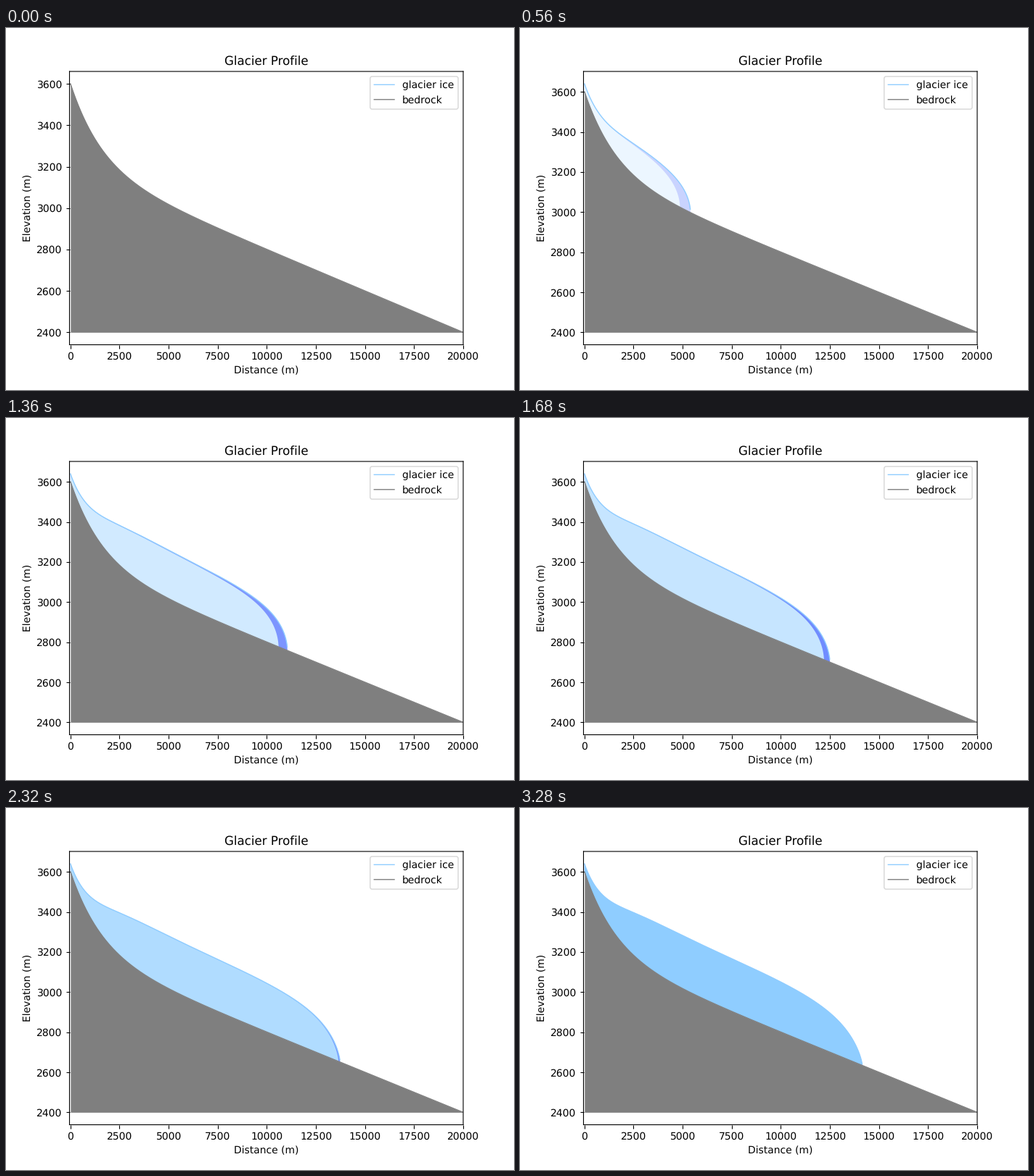
Recreate the animation shown at these times as a matplotlib script. Size 700 px wide and 500 px high, loop 3360 ms.

```python
import numpy as np
import matplotlib.pyplot as plt
from matplotlib.animation import FuncAnimation
from matplotlib.patches import Polygon

# Soft, unsnapped edges and unhinted text
plt.rcParams.update({"path.snap": False, "text.hinting": "none"})

FRAMES = 42
FLOOR = 2400
MAX_LENGTH = 14150
HEAD = 40  # ice thickness at the top of the valley
PEAK = 270

ICE = np.array([143, 205, 255]) / 255
FRESH = np.array([112, 140, 255]) / 255
ROCK = "#7f7f7f"

x = np.linspace(0, 20000, 2001)
bed = FLOOR + 800 * (1 - x / 20000) + 400 * np.exp(-x / 1600)

# Terminus: step, length (m), speed (m per step)
TERMINUS = [
    (1, 2700, 330), (7, 5400, 550), (12, 8450, 570), (17, 11050, 430),
    (21, 12500, 280), (29, 13730, 75), (41, MAX_LENGTH, 10),
]


def glacier_length(n):
    """Cubic Hermite interpolation of the terminus position."""
    for (n0, a, va), (n1, b, vb) in zip(TERMINUS, TERMINUS[1:]):
        if n <= n1:
            break
    h = n1 - n0
    s = (n - n0) / h
    return ((1 + 2 * s) * (1 - s) ** 2 * a + s * (1 - s) ** 2 * h * va
            + s * s * (3 - 2 * s) * b + s * s * (s - 1) * h * vb)


def thickness(n):
    if n < 1:
        return np.zeros_like(x)
    length = glacier_length(n)
    rel = length / MAX_LENGTH
    power = 0.58 + 0.17 * rel ** 12
    scale = 860 + 100 * rel + 220 * rel ** 12

    def snout(d):
        return 1 - np.exp(-(np.maximum(d, 0) / scale) ** power)

    peak = PEAK - 97 * (1 - rel) ** 1.2
    body = HEAD + (peak - HEAD) * (1 - np.exp(-(x / 2022) ** 1.6))
    growth = 1 - max(0, 1 - n / 7) ** 4
    return growth * body * snout(length - x) / snout(length)


def tint(color, amount):
    return 1 - amount * (1 - color)


def outline(top):
    return np.column_stack([np.r_[x, x[::-1]], np.r_[top, bed[::-1]]])


fig, ax = plt.subplots(figsize=(7, 5), dpi=100)
fig.subplots_adjust(left=0.125, right=0.9, bottom=0.125, top=0.88)
ax.set_title("Glacier Profile")
ax.set_xlabel("Distance (m)")
ax.set_ylabel("Elevation (m)")
ax.set_xlim(-50, 20000)

fresh = ax.add_patch(Polygon(outline(bed), lw=0, zorder=1))
old = ax.add_patch(Polygon(outline(bed), lw=0, zorder=1.1))
surface, = ax.plot([], [], color=ICE, lw=1, zorder=1.2, label="glacier ice")
ax.fill_between(x, FLOOR, bed, color=ROCK, lw=0, zorder=1.3)
ax.plot(x, bed, color=ROCK, lw=1, zorder=1.4, label="bedrock")
ax.legend(loc="upper right")


def update(n):
    now, before = thickness(n), thickness(n - 1)
    top = bed + now
    fresh.set_xy(outline(top))
    fresh.set_facecolor(tint(FRESH, min(1, n / 18.5)))
    old.set_xy(outline(bed + np.minimum(now, before)))
    old.set_facecolor(tint(ICE, n / (FRAMES - 1)))
    icy = now > 0
    surface.set_data(x[icy], top[icy])
    margin = 0.05 * (top.max() - FLOOR)
    ax.set_ylim(FLOOR - margin, top.max() + margin)
    return fresh, old, surface


anim = FuncAnimation(fig, update, frames=FRAMES, interval=80,
                     repeat=True, repeat_delay=0, blit=False)
plt.show()
```
